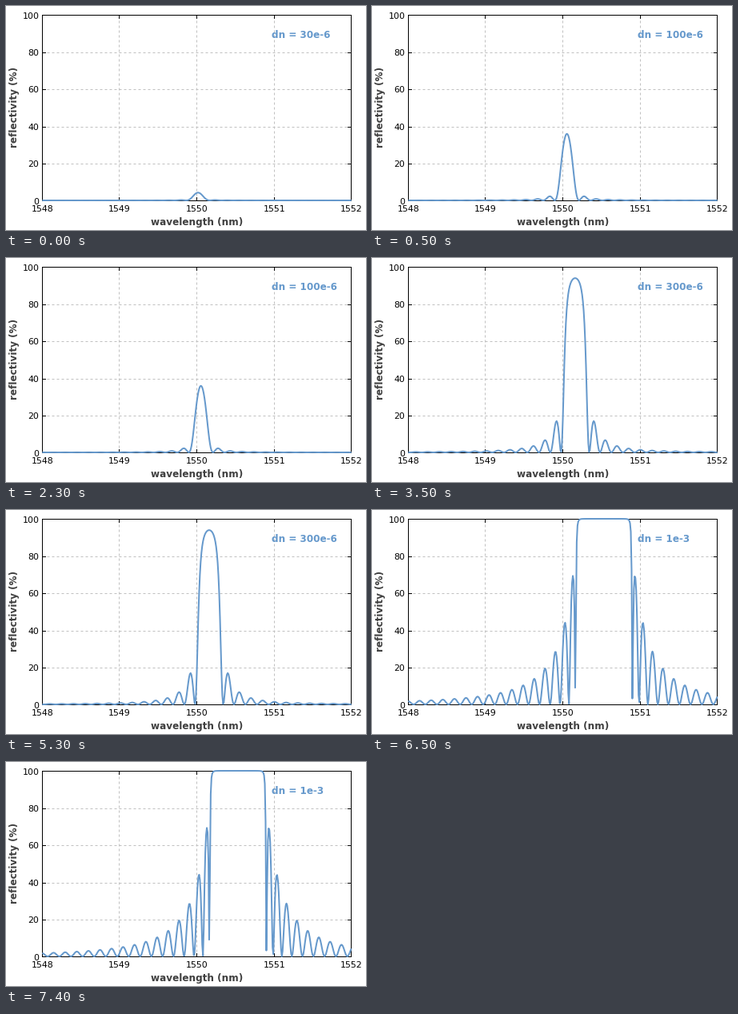
Recreate the animation shown at these times as a matplotlib script. Size 450 px wide and 280 px high, loop 8 s.

```python
import math

import numpy as np
import matplotlib.pyplot as plt
from matplotlib.animation import FuncAnimation

W, H, DPI = 450, 280, 100
LEFT, RIGHT, TOP, BOTTOM = 44.8, 431.2, 11, 243
BLUE, GRID, LABEL = "#6699cc", "#c0c0c0", "#404040"

BRAGG = 1550.0        # design wavelength, nm
SHIFT = 532.25        # centre shift in nm per unit index change
COUPLING = 6918.0     # coupling strength times length, per unit index change
DETUNING = 0.0486     # nm per unit of detuning times length

# index change, its label, and how many half-second steps it is shown
STAGES = [(30e-6, "30e-6", 1), (100e-6, "100e-6", 6),
          (300e-6, "300e-6", 6), (1e-3, "1e-3", 3)]
SCHEDULE = [stage for stage in STAGES for _ in range(stage[2])]

wavelength = 1548 + 0.01 * np.arange(401)


def x_pos(nm):
    return LEFT + (nm - 1548) / 4 * (RIGHT - LEFT)


def y_pos(percent):
    return BOTTOM - percent / 100 * (BOTTOM - TOP)


def reflectivity(dn):
    """Coupled-mode reflectivity of a uniform Bragg grating, in percent."""
    centre = BRAGG + SHIFT * dn
    kappa = COUPLING * dn
    delta = centre / DETUNING * (centre / wavelength - 1)
    gamma = np.sqrt(kappa**2 - delta**2 + 0j)
    s, c = np.sinh(gamma), np.cosh(gamma)
    return 100 * np.abs(kappa * s / (gamma * c + 1j * delta * s)) ** 2


plt.rcParams["path.simplify"] = False
fig = plt.figure(figsize=(W / DPI, H / DPI), dpi=DPI, facecolor="white")
ax = fig.add_axes([0, 0, 1, 1])
ax.set_xlim(0, W)
ax.set_ylim(H, 0)
ax.axis("off")


def px(n):
    return n * 72 / DPI


def segment(x0, y0, x1, y1, color="black", **style):
    """One-pixel line through pixel centres."""
    ax.plot([x0 + 0.5, x1 + 0.5], [y0 + 0.5, y1 + 0.5], color=color,
            lw=px(1), snap=False, solid_capstyle="projecting", **style)


def write(x, y, text, size=11, **style):
    style = {"va": "baseline", "family": "DejaVu Sans", **style}
    return ax.text(x, y, text, fontsize=px(size), **style)


left, right = round(LEFT), round(RIGHT)
dashes = dict(color=GRID, ls=(0, (3, 3)), dash_capstyle="butt", zorder=1)

for nm in range(1548, 1553):
    x = round(x_pos(nm))
    if 1548 < nm < 1552:
        segment(x, BOTTOM, x, TOP, **dashes)
        segment(x, BOTTOM, x, BOTTOM - 4)
        segment(x, TOP, x, TOP + 4)
    write(x + 0.5, 257, str(nm), ha="center")

for percent in range(0, 101, 20):
    y = math.ceil(y_pos(percent))
    if 0 < percent < 100:
        segment(left, y, right, y, **dashes)
        segment(left, y, left + 4, y)
        segment(right, y, right - 4, y)
    write(41.5, int(y_pos(percent)) + 5, str(percent), ha="right")

for edge in [(left, TOP, right, TOP), (left, BOTTOM, right, BOTTOM),
             (left, TOP, left, BOTTOM), (right, TOP, right, BOTTOM)]:
    segment(*edge)

bold = dict(size=12, weight="bold")
write(238.8, 274, "wavelength (nm)", ha="center", color=LABEL, **bold)
write(11, 126.5, "reflectivity (%)", ha="center", va="center", rotation=90,
      color=LABEL, **bold)
caption = write(332.4, 40, "", color=BLUE, zorder=6, **bold)

# The curve lies over the frame of the plot, which shows where it lifts off.
curve, = ax.plot([], [], color=BLUE, lw=px(2), zorder=5, snap=False,
                 solid_joinstyle="round", solid_capstyle="butt")


def update(i):
    dn, name, _ = SCHEDULE[i]
    curve.set_data(x_pos(wavelength) + 0.5, y_pos(reflectivity(dn)))
    caption.set_text("dn = " + name)
    return curve, caption


anim = FuncAnimation(fig, update, frames=len(SCHEDULE), interval=500,
                     repeat=True, repeat_delay=0, blit=False)
plt.show()
```
